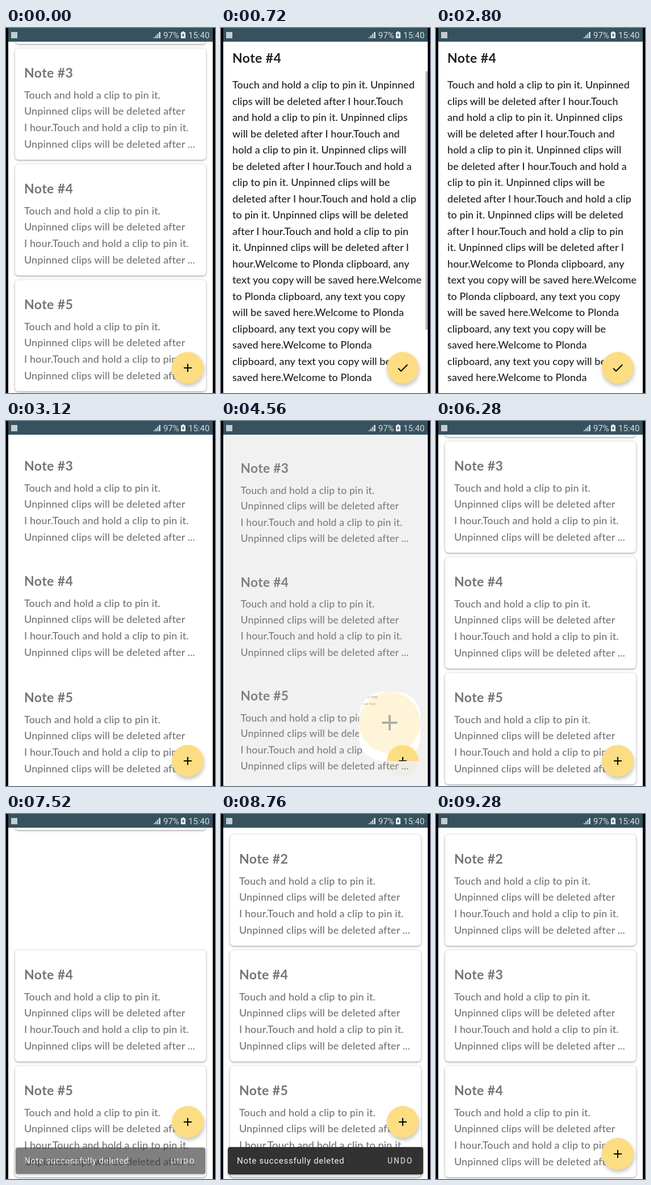
Animation of 368 by 640 pixels, one loop 9.32 s. Source, as an HTML page:

```html
<!DOCTYPE html>
<html lang="en">
<head>
<meta charset="utf-8">
<title>Notes app</title>
<style>
html, body { margin: 0; width: 100%; height: 100%; overflow: hidden; background: #000; }
#stage { position: relative; width: 368px; height: 640px; overflow: hidden; background: #000; }
#stage div, #stage svg { position: absolute; }
#stage div { box-sizing: border-box; }
#status { left: 4px; top: 0; width: 360px; height: 24px; background: #36525f; }
#status svg { left: 0; top: 0; }
#status text { font: 15px Roboto, Arial, sans-serif; fill: #d3dcdf; }
#app { left: 4px; top: 24px; width: 360px; height: 616px; overflow: hidden; background: #fff; }
#list, #scrim, .page { left: 0; top: 0; width: 360px; height: 616px; }
#scrim { background: #000; }
.page { background: #fff; color: #212121; transform-origin: 0 0; }
.title { font: bold 23px/30px Lato, sans-serif; letter-spacing: .4px; white-space: pre; }
.body { font: 500 18px/28.5px Lato, sans-serif; letter-spacing: .07px; white-space: pre; }
.card { left: 12px; width: 336px; height: 194.5px; border-radius: 6px; background: #fff; color: #757575;
  overflow: hidden; transform-origin: 0 0; }
.raised { box-shadow: 0 1px 4px rgba(0,0,0,.34), 0 1px 1px rgba(0,0,0,.12); }
.card .title { left: 16px; top: 27px; }
.card .body { left: 16px; top: 66.8px; line-height: 28.65px; letter-spacing: .12px; }
.page .title { left: 16px; top: 13px; }
.page .body { left: 16px; top: 61.3px; }
.form .title { font-size: 21px; letter-spacing: 0; color: #999; }
.form .body { font-size: 17px; top: 57px; color: #999; }
.fab { left: 288px; top: 544px; width: 56px; height: 56px; border-radius: 50%; background: #fddd82;
  overflow: hidden; transform-origin: 0 0; }
.fab.lift { box-shadow: 1px 4px 7px rgba(0,0,0,.24); }
.fab svg { left: 16px; top: 16px; }
.ripple { border-radius: 50%; background: #000; opacity: 0; }
#bar { left: 356px; top: 52px; width: 4px; height: 453px; background: #b6b6b6; }
.box { overflow: hidden; background: #fff; }
.box .start { left: 0; top: 0; }
#snack { left: 8px; top: 560px; width: 344px; height: 48px; border-radius: 4px; background: #323232;
  box-shadow: 0 2px 5px rgba(0,0,0,.3); overflow: hidden; white-space: pre; }
#msg { left: 16px; top: 0; font: 15px/48px Roboto, Arial, sans-serif; letter-spacing: .7px; color: #f2f2f2; }
#undo { left: 281px; top: 0; font: 500 14px/48px Roboto, Arial, sans-serif; letter-spacing: 1.8px; color: #b9c4c9; }
</style>
</head>
<body>
<div id="stage">
  <div id="app"></div>
  <div id="status">
    <svg width="360" height="24">
      <rect x="5" y="7" width="11" height="11" fill="#c3ccd0"/>
      <path d="M256 18v-2h2v2zM259 18v-5h2v5zM262 18v-8h2v8zM265 18V7h3v11z" fill="#cbd5d9"/>
      <path d="M304 7.5h2.5V6h3v1.500h2.500V18h-8z" fill="#f2f5f6"/>
      <path d="M309 8.500l-3.500 4.500h2l-.8 3.500 3.500-4.500h-2z" fill="#2c4550"/>
      <text x="273" y="17.600">97%</text>
      <text x="317" y="17.600">15:40</text>
    </svg>
  </div>
</div>
<script>
const LOOP = 9320, STEP = 40, PITCH = 203, W = 360, H = 616;
const PLUS = 'M19 13h-6v6h-2v-6H5v-2h6V5h2v6h6z';
const CHECK = 'M9 16.170L4.830 12l-1.420 1.410L9 19 21 7l-1.410-1.410z';
const CLIP = `Touch and hold a clip to pin it.
Unpinned clips will be deleted after
I hour.Touch and hold a clip to pin it.
Unpinned clips will be deleted after ...`;
const NOTE = `Touch and hold a clip to pin it. Unpinned
clips will be deleted after I hour.Touch
and hold a clip to pin it. Unpinned clips
will be deleted after I hour.Touch and
hold a clip to pin it. Unpinned clips will
be deleted after I hour.Touch and hold a
clip to pin it. Unpinned clips will be
deleted after I hour.Touch and hold a clip
to pin it. Unpinned clips will be deleted
after I hour.Touch and hold a clip to pin
it. Unpinned clips will be deleted after I
hour.Welcome to Plonda clipboard, any
text you copy will be saved here.Welcome
to Plonda clipboard, any text you copy
will be saved here.Welcome to Plonda
clipboard, any text you copy will be
saved here.Welcome to Plonda
clipboard, any text you copy will be
saved here.Welcome to Plonda`;

const clamp = v => Math.min(1, Math.max(0, v));
const lerp = (a, b, k) => a + (b - a) * k;
const span = (t, a, len) => clamp((t - a) / len);

// cubic-bezier(.4, 0, .2, 1)
function ease(x) {
  if (x <= 0 || x >= 1) return clamp(x);
  let lo = 0, hi = 1, s;
  for (let i = 0; i < 24; i++) {
    s = (lo + hi) / 2;
    const r = 1 - s;
    if (1.2 * s * r * r + .6 * s * s * r + s * s * s < x) lo = s; else hi = s;
  }
  return s * s * (3 - 2 * s);
}
const smooth = x => .5 - Math.cos(Math.PI * x) / 2;

function add(parent, cls, html = '') {
  const el = document.createElement('div');
  el.className = cls;
  el.innerHTML = html;
  parent.append(el);
  return el;
}
const text = (title, body) => `<div class="title">${title}</div><div class="body">${body}</div>`;
const addCard = (parent, n, cls = '') => add(parent, 'card ' + cls, text('Note #' + n, CLIP));
const addFab = (parent, icon, cls = 'lift') =>
  add(parent, 'fab ' + cls, `<svg width="24" height="24"><path d="${icon}"/></svg>`);

function addRipple(parent, size, x, y) {
  const el = add(parent, 'ripple');
  Object.assign(el.style, { width: size + 'px', height: size + 'px',
    left: x - size / 2 + 'px', top: y - size / 2 + 'px' });
  return el;
}
function setRipple(el, t, from, len) {
  const k = span(t, from, len);
  el.style.transform = `scale(${lerp(.3, 1, k)})`;
  el.style.opacity = t < from || t > from + len + 80 ? 0 : .1;
}
const show = (el, on) => { el.style.visibility = on ? 'visible' : 'hidden'; };

const app = document.getElementById('app');
const list = add(app, '');
list.id = 'list';
const cards = [2, 3, 4, 5].map(n => addCard(list, n, 'raised'));
const cardRipple = addRipple(cards[2], 390, 168, 97);
const fab = addFab(list, PLUS);
const fabRipple = addRipple(fab, 56, 28, 28);
const scrim = add(app, '');
scrim.id = 'scrim';

// A view that grows out of a smaller element and shrinks back into it
function makeView(from, open, back, fillStart, pageCls, pageHtml) {
  const box = add(app, 'box');
  const start = fillStart(box);
  start.classList.add('start');
  start.style.left = start.style.top = 0;
  const page = add(box, 'page ' + pageCls, pageHtml);
  addFab(page, CHECK);
  return { from, open, back, box, start, page };
}
const detail = makeView({ x: 12, y: 215, w: 336, h: 194.5, r: 6 }, 410, 2840,
  b => addCard(b, 4), '', text('Note #4', NOTE));
const form = makeView({ x: 288, y: 544, w: 56, h: 56, r: 28 }, 4494, 5960,
  b => addFab(b, PLUS, ''), 'form', text('Enter Title', 'Enter Note'));
const bar = add(detail.page, '');
bar.id = 'bar';
const ghost = addFab(app, PLUS, '');

const snack = add(app, '', '<div id="msg">Note successfully deleted</div><div id="undo">UNDO</div>');
snack.id = 'snack';
const undoRipple = addRipple(snack, 70, 304, 24);
undoRipple.style.background = '#fff';

function drawView(v, t) {
  const back = t >= v.back, f = v.from;
  const q = ease(span(t, back ? v.back : v.open, 300));
  const p = back ? 1 - q : q;
  const mask = back ? 1 - clamp(q / .9) : p;
  const w = lerp(f.w, W, p), scale = w / f.w;
  const h = lerp(f.h * scale, H * w / W, mask);
  const x = lerp(f.x + f.w / 2, W / 2, p) - w / 2;
  const y = lerp(f.y, 0, p);
  const r = f.r * scale * (back ? clamp((q - .3) / .6) : 1 - clamp(p / .75));
  show(v.box, p > 0);
  Object.assign(v.box.style, { left: x + 'px', top: y + 'px', width: w + 'px',
    height: h + 'px', borderRadius: r + 'px' });
  v.start.style.transform = `scale(${scale})`;
  v.page.style.transform = `scale(${w / W})`;
  v.page.style.opacity = back ? 1 - clamp((q - .6) / .3) : clamp(p / .25);
  return { p, back, bottom: y + h };
}

function drawCards(t) {
  const fill = smooth(span(t, 7600, 250)), push = smooth(span(t, 8880, 250));
  const restored = t >= 9130;
  const tops = [-191 + PITCH * fill, restored ? 215 : 12, 215 + PITCH * push, 418 + PITCH * push];
  cards.forEach((c, i) => { c.style.top = tops[i] + 'px'; });
  const swipe = restored ? 0 : smooth(span(t, 7120, 330));
  cards[1].style.transform = `translateX(${-364 * swipe}px)`;
  cards[1].style.opacity = restored ? span(t, 9130, 120) : 1;
}

function drawSnack(t) {
  const k = span(t, 7427, 150), out = span(t, 8880, 75);
  show(snack, k > 0 && out < 1);
  snack.style.opacity = k * (1 - out);
  snack.style.transform = `scale(${lerp(.8, 1, 1 - (1 - k) ** 2)})`;
  fab.style.top = (k > 0 && out < 1 ? 488 : 544) + 'px';
  setRipple(undoRipple, t, 8800, 80);
}

function draw(t) {
  drawCards(t);
  drawSnack(t);
  setRipple(cardRipple, t, 200, 220);
  setRipple(fabRipple, t, 4240, 220);
  bar.style.opacity = 1 - span(t, 1880, 260);

  const d = drawView(detail, t), f = drawView(form, t);
  const p = Math.max(d.p, f.p);
  list.style.transform = `scale(${1 - .1 * p})`;
  list.style.opacity = 1 - .8 * p;
  scrim.style.opacity = .32 * p;
  cards.forEach(c => c.classList.toggle('raised', p === 0));
  show(cards[2], d.p === 0);

  // The pressed button lingers briefly, bright down to the edge of the growing sheet
  const linger = f.p > 0 && f.p < .3 && !f.back;
  show(fab, f.p === 0 || linger);
  fab.style.opacity = linger ? .1 : 1;
  show(ghost, linger);
  ghost.style.clipPath = `inset(0 0 ${Math.max(0, 600 - f.bottom)}px 0)`;
}

const begin = performance.now();
function tick() {
  const t = (performance.now() - begin) % LOOP;
  draw(Math.floor(t / STEP) * STEP);
  requestAnimationFrame(tick);
}
tick();
</script>
</body>
</html>
```
